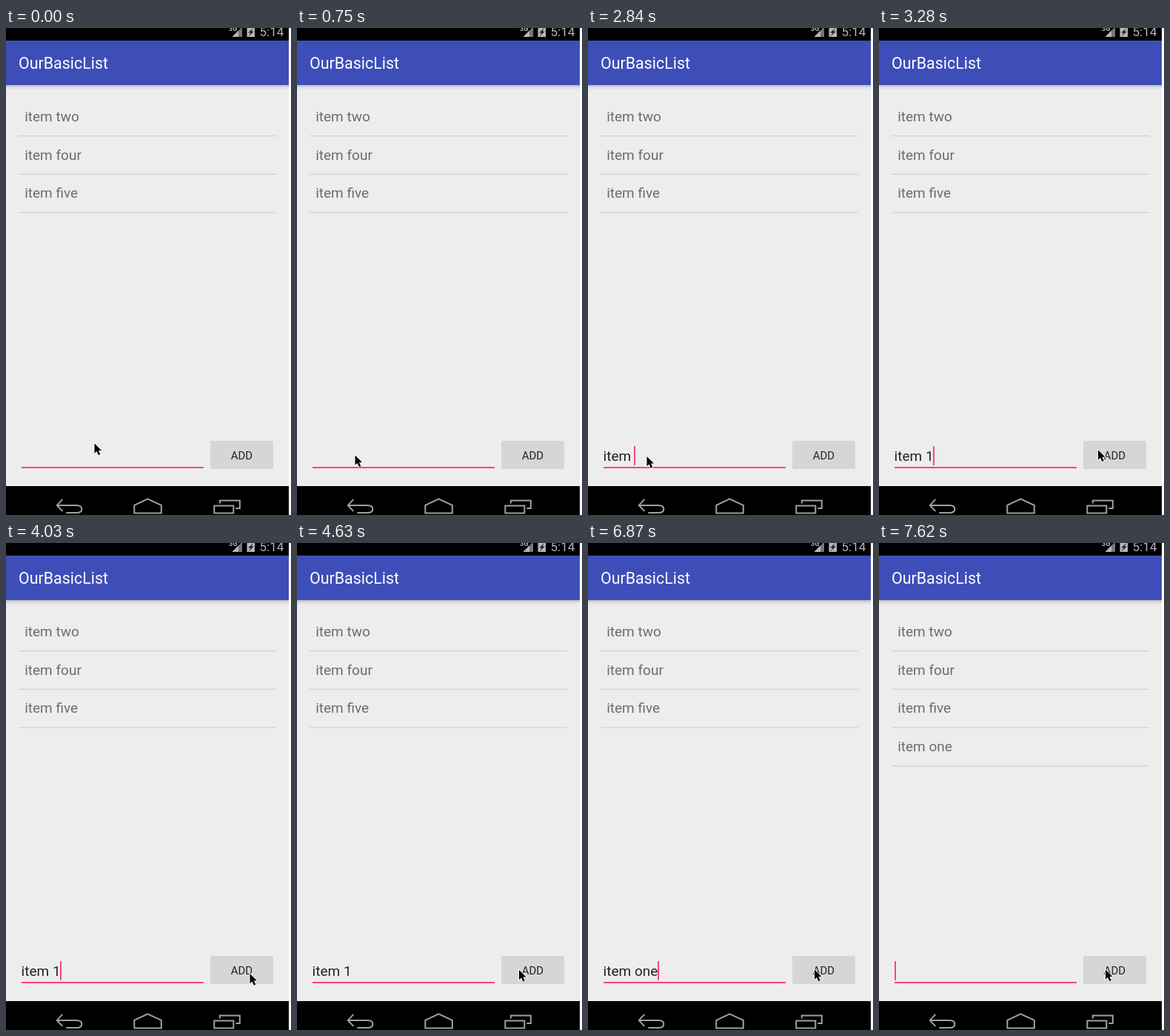
An HTML page that plays this animation: 385x657 px, repeating every 8000 ms.

```html
<!DOCTYPE html>
<html lang="en">
<head>
<meta charset="utf-8">
<title>To-do list</title>
<style>
  html, body { margin: 0; width: 100%; height: 100%; overflow: hidden; background: #fff; }
  svg { display: block; width: 385px; height: 657px; font: 19px Roboto, sans-serif; }
  text { white-space: pre; }
  .icon { fill: none; stroke: #a0a0a0; stroke-width: 2; }
</style>
</head>
<body>
<svg viewBox="0 0 385 657">
  <defs>
    <linearGradient id="shade" x2="0" y2="1">
      <stop stop-color="#bcbcc2"/>
      <stop offset=".45" stop-color="#dedede"/>
      <stop offset="1" stop-color="#ededed"/>
    </linearGradient>
  </defs>
  <rect width="382" height="657" fill="#ededed"/>

  <!-- status bar -->
  <rect width="382" height="17"/>
  <g fill="#b8b8b8">
    <path d="M319 0V12H305.500L317.500 0Z" fill="#777"/>
    <path d="M314 3.500V12H305.500Z"/>
    <text x="301" y="3.500" font-size="9" font-weight="700">3G</text>
    <path d="M325.500 0H336V12H325.500Z"/>
    <path d="M334 0L327 6.500H330.500L327.500 11.500L335 4.500H331.500Z" fill="#222"/>
    <text x="342.500" y="11" font-size="17">5:14</text>
  </g>

  <!-- app bar -->
  <rect y="17" width="382" height="60" fill="#3e4eb8"/>
  <rect y="77" width="382" height="7" fill="url(#shade)"/>
  <text x="17" y="55" font-size="21.400" fill="#fff">OurBasicList</text>

  <g id="list" fill="#6c6c6c"></g>

  <!-- input row -->
  <text id="field" x="20.600" y="584" fill="#222"></text>
  <rect x="21" y="592" width="246" height="2" fill="#ff4081"/>
  <rect id="caret" y="564" width="2" height="26" fill="#ff4081"/>
  <rect x="276" y="557" width="85" height="38" rx="2" fill="#d6d6d6"/>
  <text x="303.700" y="581.500" font-size="14.900" fill="#222">ADD</text>

  <!-- navigation bar -->
  <rect y="618" width="382" height="39"/>
  <g class="icon" transform="translate(.3 .4)">
    <path d="M76 635.500L68.500 643.500L76 651.500M69 643.500H95Q102 643.500 102 648.500T95 653.500H81"/>
    <path d="M173 654V643.500L191 635L209.500 643.500V654Z"/>
    <path d="M281 644H307V654H281ZM288.500 641V637H315.500V647.500H310"/>
  </g>

  <path id="mouse" d="M0 0V13.200L3 10.400L5.400 15.800L7.800 14.700L5.500 9.500H9.600Z"
    stroke="#fff" stroke-width="1.600" paint-order="stroke"/>
</svg>
<script>
const LOOP = 8000, TICK = 149, BLINK = 500;
const $ = id => document.getElementById(id);
const list = $('list'), field = $('field'), caret = $('caret'), mouse = $('mouse');

['two', 'four', 'five', 'one'].forEach((word, i) => {
  list.insertAdjacentHTML('beforeend', `<g transform="translate(0 ${i * 51.7})">
    <text x="25.2" y="126">item ${word}</text>
    <rect x="17" y="145" width="348" height="1.2" fill="#d0d0d0"/></g>`);
});
const added = list.lastElementChild;

// One sign per tick: '.' idle, '|' tap on the field, '<' backspace, '+' add
const idle = n => '.'.repeat(n);
const keys = idle(12) + '|..item 1' + idle(11) + '<.o.ne' + idle(13) + '+';
const addTick = keys.indexOf('+');

// Mouse strokes: first tick, last tick, end point
const home = [119.5, 560.5];
const strokes = [
  [1, 5, 78.5, 576.5], [8, 10, 79.5, 578], [19, 22, 296, 569.3],
  [22, 24, 329.5, 581], [28, 31, 300, 576], [44, 46, 306, 575.5]
];
const ease = p => p * p * (3 - 2 * p);

function type(tick) {
  let text = '', last = -700;
  [...keys.slice(0, tick + 1)].forEach((key, i) => {
    if (key === '.') return;
    last = i * TICK;
    if (key === '<') text = text.slice(0, -1);
    else if (key === '+') text = '';
    else if (key !== '|') text += key;
  });
  return [text, last];
}

function point(tick) {
  let [x, y] = home;
  for (const [from, to, endX, endY] of strokes) {
    const p = ease(Math.min(1, Math.max(0, (tick - from) / (to - from))));
    x += (endX - x) * p;
    y += (endY - y) * p;
  }
  return [x, y];
}

function draw(now) {
  const tick = Math.floor(now % LOOP / TICK);
  const [text, last] = type(tick);
  field.textContent = text;
  const end = text ? field.getComputedTextLength() : 0;
  caret.setAttribute('x', Math.max(21, Math.floor(20.6 + end)));
  // The caret restarts its blinking at every key
  const phase = Math.floor(((tick + 0.5) * TICK - last) / BLINK);
  caret.style.opacity = 1 - phase % 2;
  added.style.opacity = tick < addTick ? 0 : 1;
  mouse.setAttribute('transform', `translate(${point(tick)})`);
  requestAnimationFrame(draw);
}
draw(0);
</script>
</body>
</html>
```
